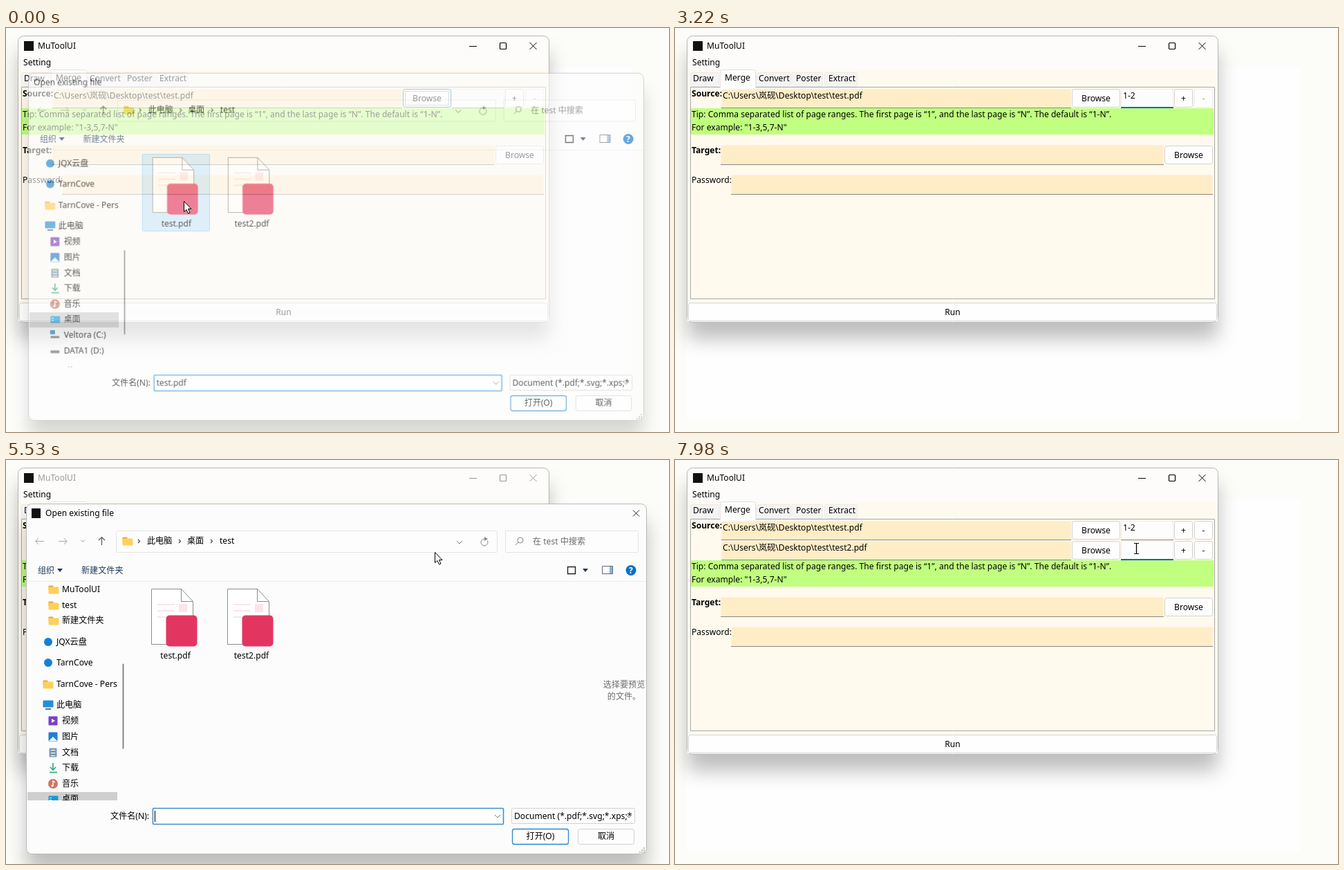
These frames come from a looping animation (959 by 584 pixels, 8 s). An HTML page with a canvas:

```html
<!DOCTYPE html>
<html lang="zh-CN">
<head>
<meta charset="utf-8">
<title>Merge pages</title>
<style>
html, body { margin: 0; width: 100%; height: 100%; overflow: hidden; background: #fcfcf9; }
canvas { display: block; width: 100vw; height: 100vh; }
</style>
</head>
<body>
<canvas id="stage" width="959" height="584"></canvas>
<script>
const W = 959, H = 584, LOOP = 8000, PAD = 60;
const FONT = '12.1px "Noto Sans", "Noto Sans CJK SC", "Noto Sans CJK", sans-serif';
const BLUE = '#0067c0';
const stage = document.getElementById('stage').getContext('2d');
const layer = document.createElement('canvas');
layer.width = W + 2 * PAD;
layer.height = H + 2 * PAD;
const sheet = layer.getContext('2d');
let g = stage;

// Steps are [time, value, value, ...]
const CURSOR = [
  [0, 257, 250], [250, 257, 250], [490, 500, 165], [730, 690, 107], [3600, 690, 107],
  [3610, 698, 104], [3900, 745, 92], [4360, 745, 92], [4870, 620, 133], [5700, 620, 133],
  [6120, 383, 207], [6150, 383, 207], [6210, 384, 216], [6850, 384, 216], [7160, 667, 128]
];
// opacity, scale
const DIALOG = [
  [0, .62, .992], [20, .62, .992], [100, 0, .92], [5335, 0, .88], [5410, .47, .915],
  [5500, .95, .99], [5530, 1, 1], [6670, 1, 1], [6720, .6, .986], [6800, 0, .92]
];

function track(steps, t) {
  let i = 0;
  while (i < steps.length - 1 && steps[i + 1][0] <= t) i++;
  const a = steps[i], b = steps[i + 1];
  if (!b) return a.slice(1);
  const p = (t - a[0]) / (b[0] - a[0]);
  return a.slice(1).map((v, k) => v + (b[k + 1] - v) * p);
}
const ramp = (t, from, to) => Math.max(0, Math.min(1, (t - from) / (to - from)));
const within = (t, from, to) => t >= from && t < to;

function fill(x0, y0, x1, y1, color) {
  g.fillStyle = color;
  g.fillRect(x0, y0, x1 - x0, y1 - y0);
}
function box(x0, y0, x1, y1, radius, color, border, width = 1) {
  g.beginPath();
  g.roundRect(x0 + .5, y0 + .5, x1 - x0 - 1, y1 - y0 - 1, radius);
  if (color) { g.fillStyle = color; g.fill(); }
  if (border) { g.strokeStyle = border; g.lineWidth = width; g.stroke(); }
}
function text(s, x, y, color = '#000', align = 'left', weight = '') {
  g.font = weight + ' ' + FONT;
  g.textAlign = align;
  g.fillStyle = color;
  g.fillText(s, x, y + 4);
}
function line(points, color, width = 1) {
  g.beginPath();
  points.forEach(([x, y]) => g.lineTo(x, y));
  g.strokeStyle = color;
  g.lineWidth = width;
  g.stroke();
}
function poly(points, color) {
  g.beginPath();
  points.forEach(([x, y]) => g.lineTo(x, y));
  g.closePath();
  g.fillStyle = color;
  g.fill();
}
function disc(x, y, r, color) {
  g.beginPath();
  g.arc(x, y, r, 0, 7);
  g.fillStyle = color;
  g.fill();
}
function chevron(x, y, color = '#777', r = 4) {
  line([[x - r, y - r / 2], [x, y + r / 2], [x + r, y - r / 2]], color);
}
function cross(x, y, r, color) {
  line([[x - r, y - r], [x + r, y + r]], color);
  line([[x - r, y + r], [x + r, y - r]], color);
}
function pane(x0, y0, x1, y1, color, border) {
  g.save();
  g.shadowColor = 'rgba(0,0,0,.25)';
  g.shadowBlur = 28;
  g.shadowOffsetY = 24;
  box(x0, y0, x1, y1, 8, color);
  g.restore();
  box(x0, y0, x1, y1, 8, color, border);
}

function field(x0, y0, x1, y1, value = '') {
  box(x0, y0, x1, y1, 2, '#feedc7');
  fill(x0, y1 - 1, x1, y1, '#8b8984');
  text(value, x0 + 2, y0 + 10);
}
function button(label, x0, y0, x1, y1, { tint = 0, focus = 0, off = false } = {}) {
  box(x0, y0, x1, y1, 3, '#fefefe', off ? '#ececec' : '#d5d3d0');
  if (tint || focus) {
    g.save();
    g.globalAlpha = tint;
    box(x0, y0, x1, y1, 3, '#cce4f7');
    g.globalAlpha = Math.max(tint, focus);
    box(x0, y0, x1, y1, 3, null, '#1f74b8');
    g.restore();
  }
  text(label, (x0 + x1) / 2, (y0 + y1) / 2, off ? '#a0a0a0' : '#000', 'center');
}
function rangeInput(y, value, focus, caretX) {
  fill(645, y, 721, y + 28, '#fdfdfd');
  box(645, y, 721, y + 28, 2, null, '#f0ece4');
  fill(645, y + 27, 721, y + 28, '#8b8984');
  g.globalAlpha = focus;
  fill(645, y + 26, 721, y + 28, BLUE);
  g.globalAlpha = 1;
  text(value, 648, y + 10);
  if (caretX) fill(caretX, y + 2, caretX + 1, y + 18, '#000');
}

function mainWindow(t) {
  const two = t >= 4200, shift = two ? 29 : 0;
  const ink = within(t, 5345, 6690) ? '#999' : '#000';
  fill(0, 0, W, H, '#fcfcf9');
  fill(16, 56, 905, 565, '#fefefe');
  pane(17, 11, 786, 426, '#fdfcfa', '#b5b5b5');
  fill(26, 19, 40, 33, '#111');
  text('MuToolUI', 46, 26, ink);
  line([[670, 26.5], [681, 26.5]], ink);
  box(714, 21, 724, 31, 1, null, ink, 1.2);
  cross(762.5, 26, 5, ink);
  text('Setting', 25, 50);

  fill(18, 60, 785, 424, '#fffaf0');
  box(22, 85, 781, 392, 0, '#fff9ee', '#a9a9a9');
  [['Draw', 22, 64], ['Convert', 117, 167], ['Poster', 168, 214], ['Extract', 216, 264]].forEach(([s, a, b]) => {
    box(a, 64, b, 85, 2, '#f5f4f3', '#eceae6');
    text(s, a + (a === 168 ? 7 : a === 216 ? 6 : 4), 73);
  });
  box(65, 60, 117, 87, 2, '#fefefe', '#e6e3dd');
  fill(66, 84, 116, 88, '#fefefe');
  text('Merge', 72, 72);

  text('Source:', 24, 95, '#000', 'left', 'bold');
  field(67, 88, 573, 116, 'C:\\Users\\岚砚\\Desktop\\test\\test.pdf');
  button('Browse', 574, 88, 644, 115, { focus: 1 - ramp(t, 1010, 1190) });
  if (t < 1010) {
    g.setLineDash([1, 1]);
    box(577, 91, 641, 112, 0, null, '#555');
    g.setLineDash([]);
  }
  const typed = t < 2170 ? '' : t < 2530 ? '1' : t < 2680 ? '1-' : '1-2';
  const caret = within(t, 1190, 1720) || within(t, 2170, 3220);
  rangeInput(88, typed, ramp(t, 1010, 1190) * (1 - ramp(t, 4090, 4250)),
    caret && 648 + [0, 7, 11, 18][typed.length]);
  const plus = t < 4380 ? ramp(t, 3780, 3900) * (t < 4090 ? .5 : 1) : 1 - ramp(t, 4380, 4620);
  button('+', 722, 88, 749, 115, { tint: plus, focus: within(t, 4090, 5180) ? 1 - ramp(t, 4900, 5180) : 0 });
  button('-', 751, 88, 778, 115, { off: t < 4400 });
  if (two) {
    field(67, 117, 573, 145, t >= 6690 ? 'C:\\Users\\岚砚\\Desktop\\test\\test2.pdf' : '');
    const hover = ramp(t, 4850, 4960) * (1 - ramp(t, 5200, 5400));
    button('Browse', 574, 117, 644, 144, {
      tint: hover * .5, focus: t >= 6690 ? 1 - ramp(t, 7270, 7450) : 0
    });
    rangeInput(117, '', ramp(t, 7270, 7450), within(t, 7300, 7980) && 648);
    button('+', 722, 117, 749, 144);
    button('-', 751, 117, 778, 144);
  }

  g.save();
  g.translate(0, shift);
  fill(23, 116, 779, 154, '#c0ff7f');
  text('Tip: Comma separated list of page ranges. The first page is “1”, and the last page is “N”. The default is “1-N”.', 24, 125);
  text('For example: "1-3,5,7-N"', 24, 144);
  text('Target:', 24, 177, '#000', 'left', 'bold');
  field(66, 169, 707, 198);
  button('Browse', 708, 170, 778, 197);
  text('Password:', 24, 220);
  field(81, 212, 778, 241);
  g.restore();
  button('Run', 19, 397, 784, 424);
}

function folder(x, y) {
  box(x, y - 6, x + 8, y + 2, 1, '#e9a93a');
  box(x, y - 4, x + 16, y + 7, 1.5, '#fcd05c');
}
const ICONS = {
  folder,
  cloud: (x, y) => disc(x + 8, y, 6, '#1480d8'),
  grey: (x, y) => disc(x + 7, y, 5.5, '#555'),
  screen(x, y) {
    box(x, y - 7, x + 16, y + 4, 1, '#2490d8');
    fill(x + 4, y + 5, x + 12, y + 7, '#4a7890');
  },
  video(x, y) {
    box(x, y - 7, x + 14, y + 7, 1, '#7b3fc4');
    poly([[x + 5, y - 3], [x + 10, y], [x + 5, y + 3]], '#fff');
  },
  picture(x, y) {
    box(x, y - 7, x + 14, y + 7, 1, '#1f7fd6');
    poly([[x + 1, y + 6], [x + 7, y], [x + 13, y + 6]], '#fff');
  },
  doc(x, y) {
    box(x + 1, y - 7, x + 13, y + 7, 1, '#7f9bb5');
    for (const d of [-4, 0, 4]) fill(x + 4, y + d, x + 10, y + d + 1, '#fff');
  },
  down(x, y) {
    line([[x + 7, y - 7], [x + 7, y + 3]], '#26a97a', 1.6);
    line([[x + 3, y - 1], [x + 7, y + 3], [x + 11, y - 1]], '#26a97a', 1.6);
    line([[x + 2, y + 6.5], [x + 13, y + 6.5]], '#26a97a', 1.6);
  },
  music(x, y) {
    disc(x + 7, y, 7, '#cf7462');
    line([[x + 7, y + 3], [x + 7, y - 4], [x + 10, y - 2]], '#fff', 1.4);
    disc(x + 6, y + 3, 1.6, '#fff');
  },
  desk(x, y) {
    box(x, y - 5, x + 15, y + 6, 1, '#1699d4');
    fill(x + 2, y - 2, x + 5, y - 1, '#fff');
    fill(x + 2, y + 1, x + 5, y + 2, '#fff');
  },
  system(x, y) {
    fill(x, y - 7, x + 7, y - 1, '#1a86d8');
    box(x, y + 1, x + 14, y + 5, 1, '#666');
  },
  drive: (x, y) => box(x, y - 1, x + 14, y + 4, 1, '#666'),
  net(x, y) {
    box(x, y - 6, x + 9, y + 2, 1, '#5a9fc8');
    box(x + 4, y - 2, x + 15, y + 6, 1, '#2490d8');
  }
};
// y, icon, label, depth
const TREE = [
  [187, 'folder', 'MuToolUI', 1], [210, 'folder', 'test', 1], [232, 'folder', '新建文件夹', 1],
  [263, 'cloud', 'JQX云盘', 0], [293, 'cloud', 'TarnCove', 0], [324, 'folder', 'TarnCove - Pers', 0],
  [354, 'screen', '此电脑', 0], [377, 'video', '视频', 1], [400, 'picture', '图片', 1],
  [423, 'doc', '文档', 1], [445, 'down', '下载', 1], [468, 'music', '音乐', 1],
  [490, 'desk', '桌面', 1], [513, 'system', 'Veltora (C:)', 1], [536, 'drive', 'DATA1 (D:)', 1],
  [566, 'net', '网络', 0], [597, 'grey', 'Zemoq', 0], [620, 'folder', 'Oskavi', 1]
];

function fileIcon(x, name, mood) {
  if (mood) box(x - 15, 181, x + 84, 294, 1, ...(mood === 2 ? ['#cce8ff', '#99d1ff'] : ['#e5f3ff', '#d4eaff']));
  g.beginPath();
  [[0, 186], [43, 186], [60, 204], [60, 266], [0, 266]].forEach(([dx, y]) => g.lineTo(x + dx + .5, y + .5));
  g.closePath();
  g.fillStyle = '#fff';
  g.fill();
  g.strokeStyle = '#8c8c8c';
  g.stroke();
  line([[x + 43.5, 186], [x + 43.5, 204.5], [x + 60, 204.5]], '#8c8c8c');
  for (const y of [208, 217, 226]) fill(x + 9, y, x + 34, y + 2, '#fbe4ea');
  fill(x + 40, 208, x + 52, 220, '#fbe4ea');
  box(x + 21, 224, x + 67, 270, 5, '#e23660');
  text(name, x + 35, 283, '#000', 'center');
}

function dialog(t) {
  const closing = t < 1000 || t >= 6670;
  const chosen = t < 1000 ? 'test.pdf' : t >= 6420 ? 'test2.pdf' : '';
  const scroll = t < 1000 ? -68 : t < 5440 ? -160 : 0;
  const thumb = t < 1000 ? [321, 445] : t < 5440 ? [264, 476] : [294, 418];
  pane(29, 63, 927, 570, '#fcfcfc', '#b9b9b9');
  if (!closing) {
    fill(37, 70, 50, 84, '#111');
    cross(911.5, 77, 4.5, '#222');
  }
  text('Open existing file', closing ? 37 : 57, 77);

  for (const [x, d, color] of [[49, -1, '#a5a5a5'], [82, 1, '#a5a5a5']]) {
    line([[x - 6, 117.5], [x + 6, 117.5]], color);
    line([[x + d * 2, 113], [x + d * 6, 117.5], [x + d * 2, 122]], color);
  }
  chevron(111, 117, '#999', 2.5);
  line([[138.5, 123], [138.5, 112]], '#555', 1.2);
  line([[134, 116], [138.5, 111.5], [143, 116]], '#555', 1.2);
  box(159, 102, 711, 134, 1, '#fdfdfd', '#e4e4e4');
  folder(168, 117);
  for (const x of [192, 251, 297]) line([[x - 1, 115], [x + 1.5, 117.5], [x - 1, 120]], '#444', 1.2);
  text('此电脑', 204, 117);
  text('桌面', 262, 117);
  text('test', 309, 117);
  chevron(656, 119);
  g.beginPath();
  g.arc(692, 119, 5, -.6, 5);
  g.strokeStyle = '#888';
  g.stroke();
  poly([[692, 111], [697, 114], [692, 117]], '#888');
  box(722, 102, 915, 134, 1, '#fdfdfd', '#e4e4e4');
  g.beginPath();
  g.arc(744, 116, 4, 0, 7);
  g.strokeStyle = '#888';
  g.stroke();
  line([[741, 119], [737, 123]], '#888');
  text('在 test 中搜索', 762, 118, '#6b6b6b');

  text('组织', 46, 160, '#1e395b');
  text('新建文件夹', 109, 160, '#1e395b');
  for (const x of [78, 838]) poly([[x - 4, 157], [x + 4, 157], [x, 162]], '#1e395b');
  box(812, 154, 824, 165, 0, null, '#222', 1.4);
  box(862, 153, 878, 165, 0, '#fff', '#667');
  fill(873, 154, 877, 164, '#7fb7e0');
  disc(904, 159.5, 7.5, '#0a72c8');
  text('?', 904, 159.5, '#fff', 'center', 'bold');
  fill(30, 175, 926, 176, '#ececec');

  g.save();
  g.beginPath();
  g.rect(30, 177, 140, 315);
  g.clip();
  TREE.forEach(([y, icon, label, depth]) => {
    y += scroll;
    if (icon === 'desk') fill(31, y - 10, 161, y + 12, '#cfcfcf');
    ICONS[icon](depth ? 61 : 53, y);
    text(label, depth ? 81 : 73, y);
  });
  g.restore();
  box(168, thumb[0], 171, thumb[1], 1, '#858585');

  fileIcon(210, 'test.pdf', chosen === 'test.pdf' ? 2 : 0);
  fileIcon(320, 'test2.pdf', t >= 6420 ? 2 : t >= 6080 ? 1 : 0);
  if (!chosen) {
    text('选择要预览', 894, 325, '#6d6d6d', 'center');
    text('的文件。', 894, 342, '#6d6d6d', 'center');
  }

  text('文件名(N):', 207, 515, '#000', 'right');
  box(212, 503, 720, 527, 1, '#fff', '#3a8fd0', 1.6);
  text(chosen, 216, 515);
  if (!chosen) fill(215, 507, 216, 523, '#000');
  chevron(711, 515);
  box(731, 503, 910, 526, 1, '#fdfdfd', '#d2d2d2');
  text('Document (*.pdf;*.svg;*.xps;*', 735, 515);
  chevron(901, 515);
  box(732, 533, 814, 556, 3, '#fdfdfd', '#2d86cc', 1.3);
  text('打开(O)', 773, 544, '#000', 'center');
  box(827, 533, 909, 556, 3, '#fdfdfd', '#d2d2d2');
  text('取消', 868, 544, '#000', 'center');
  for (let i = 0; i < 3; i++)
    for (let k = 0; k <= i; k++) fill(922 - 3 * k, 560 + 3 * i, 924 - 3 * k, 562 + 3 * i, '#bbb');
}

function cursor(t) {
  if (within(t, 2190, 3610)) return;
  const [x, y] = track(CURSOR, t);
  const d = t >= 4200 ? 29 : 0;
  const fields = [[67, 88, 573, 116 + d], [645, 88, 721, 116 + d], [66, 169 + d, 707, 198 + d], [81, 212 + d, 778, 241 + d]];
  const overField = fields.some(([a, b, c, e]) => x >= a && x < c && y >= b && y < e);
  if (overField && !within(t, 5340, 6690)) {
    const cx = Math.round(x) + .5, cy = Math.round(y);
    line([[cx, cy - 7], [cx, cy + 7]], '#000', 1.3);
    for (const s of [-7.5, 7.5]) line([[cx - 3.5, cy + s], [cx + 3.5, cy + s]], '#000');
    return;
  }
  g.save();
  g.translate(Math.round(x) + .5, Math.round(y) + .5);
  g.beginPath();
  [[0, 0], [0, 15], [3.5, 12], [6, 17.5], [8.5, 16.5], [6, 11], [10.5, 11]].forEach(p => g.lineTo(...p));
  g.closePath();
  g.fillStyle = '#fff';
  g.fill();
  g.strokeStyle = '#000';
  g.lineWidth = 1;
  g.stroke();
  g.restore();
}

function draw(t) {
  g = stage;
  g.clearRect(0, 0, W, H);
  mainWindow(t);
  const [alpha, scale] = track(DIALOG, t);
  if (alpha > 0) {
    g = sheet;
    g.setTransform(1, 0, 0, 1, 0, 0);
    g.clearRect(0, 0, layer.width, layer.height);
    g.translate(PAD, PAD);
    dialog(t);
    g = stage;
    g.save();
    g.globalAlpha = alpha;
    g.translate(477.5 - 60 * (1 - scale), 316 - 30 * (1 - scale));
    g.scale(scale, scale);
    g.drawImage(layer, -477.5 - PAD, -316 - PAD);
    g.restore();
  }
  cursor(t);
}

const start = performance.now();
function tick() {
  draw((performance.now() - start) % LOOP);
  requestAnimationFrame(tick);
}
tick();
</script>
</body>
</html>
```
